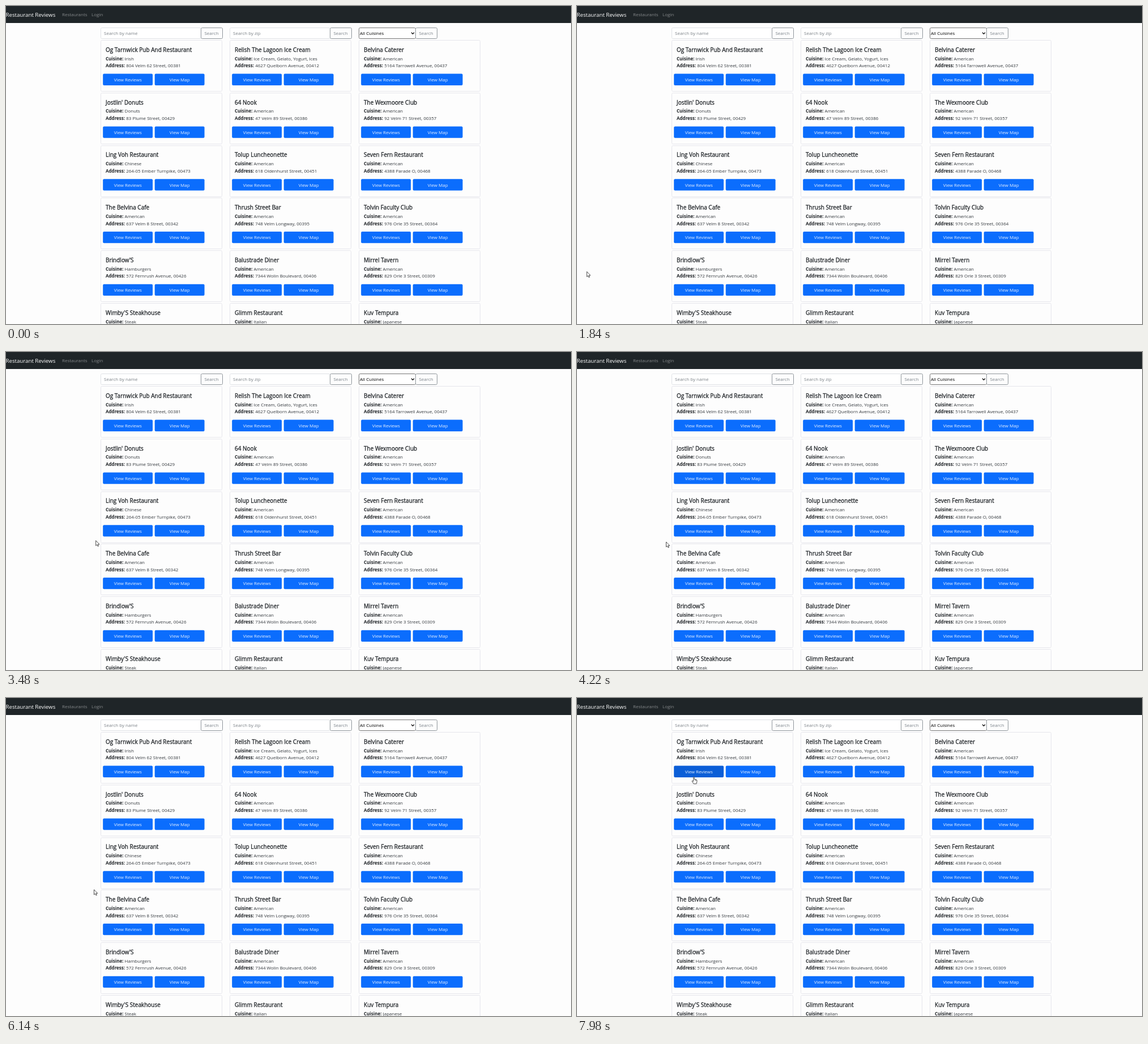
An HTML page with a canvas for the animation above (8 s loop, 998 by 561 pixels).

```html
<!DOCTYPE html>
<html lang="en">
<head>
<meta charset="utf-8">
<title>Restaurant Reviews</title>
<style>
  html, body { margin: 0; width: 100%; height: 100%; overflow: hidden; background: #fdfdfd; }
  #stage { position: absolute; left: 0; top: 0; width: 998px; height: 561px; overflow: hidden; }
  canvas, svg { position: absolute; left: 0; top: 0; }
  .t { position: absolute; white-space: pre; color: #33383d;
       font: 400 8px/16px "Open Sans", "Noto Sans", sans-serif; }
  .t b { font-weight: 700; color: #212529; }
  .title { font-size: 10px; color: #212529; -webkit-text-stroke: .3px #212529; }
  .brand { font-size: 9.7px; color: #fff; }
  .link { color: #85888a; }
  .hint { color: #7b8187; }
  .btn { width: 88px; text-align: center; color: #e6f0ff; }
  .find { width: 38px; text-align: center; color: #7b838a; }
  .pick { color: #000; }
</style>
</head>
<body>
<div id="stage">
  <canvas id="shapes" width="998" height="561"></canvas>
  <div id="text"></div>
  <svg width="998" height="561" stroke="#222" stroke-linejoin="round" fill="#fff">
    <path id="arrow" stroke-width=".8" d="M0 0V9L2.1 7.2L3.5 10.2L4.9 9.6L3.6 6.6H6.3Z"/>
    <path id="hand" stroke-width=".8" d="M-.8 .6Q0-.5 .8 .6V4.4L2.3 4.7L4.8 5.4Q5.8 5.9 5.5 7.4L4.5 12.3H-.5L-3.2 8.2Q-3.7 6.9-2.5 6.9L-.8 8.2ZM2.3 4.9V6.6M3.9 5.3V6.8"/>
  </svg>
</div>
<script>
const LOOP = 8000;
const COLS = [167, 395, 623];
const PITCH = 92.8;
const BUTTON = { dx: 4.2, dy: 59.6, w: 87.9, h: 20.3, step: 91.5 };
const PLACES = [
  ["Og Tarnwick Pub And Restaurant", "Irish", "804 Velm 62 Street, 00381"],
  ["Relish The Lagoon Ice Cream", "Ice Cream, Gelato, Yogurt, Ices", "4627 Quelborn Avenue, 00412"],
  ["Belvina Caterer", "American", "5164 Tarrowell Avenue, 00437"],
  ["Jostlin' Donuts", "Donuts", "83 Plume Street, 00429"],
  ["64 Nook", "American", "47 Velm 89 Street, 00386"],
  ["The Wexmoore Club", "American", "92 Velm 71 Street, 00357"],
  ["Ling Voh Restaurant", "Chinese", "264-05 Ember Turnpike, 00473"],
  ["Tolup Luncheonette", "American", "618 Oldenhurst Street, 00451"],
  ["Seven Fern Restaurant", "American", "4388 Parade O, 00468"],
  ["The Belvina Cafe", "American", "637 Velm 8 Street, 00342"],
  ["Thrush Street Bar", "American", "748 Velm Longway, 00395"],
  ["Tolvin Faculty Club", "American", "976 Orle 35 Street, 00364"],
  ["Brindlow'S", "Hamburgers", "572 Fernrush Avenue, 00426"],
  ["Balustrade Diner", "American", "7344 Wolin Boulevard, 00406"],
  ["Mirrel Tavern", "American", "829 Orle 3 Street, 00309"],
  ["Wimby'S Steakhouse", "Steak"],
  ["Glimm Restaurant", "Italian"],
  ["Kuv Tempura", "Japanese"]
];
// Pointer path: time, x, y
const PATH = [
  [1680, -4, 487], [1840, 17, 469], [2560, 160, 330], [2640, 160, 330],
  [4220, 157.5, 335], [6140, 155.5, 338], [7300, 155.5, 338], [7860, 206.5, 139]
];

const $ = id => document.getElementById(id);
const ctx = $("shapes").getContext("2d");

function label(str, x, y, kind, bold) {
  const el = document.createElement("div");
  el.className = "t " + kind;
  el.style.left = x + "px";
  el.style.top = y - 8 + "px";
  if (bold) {
    const b = document.createElement("b");
    b.textContent = bold + " ";
    el.append(b);
  }
  el.append(str);
  $("text").append(el);
}

function box(x, y, w, h, fill, stroke, r = 2) {
  const inset = stroke ? .5 : 0;
  ctx.beginPath();
  ctx.roundRect(x + inset, y + inset, w - 2 * inset, h - 2 * inset, r);
  if (fill) { ctx.fillStyle = fill; ctx.fill(); }
  if (stroke) { ctx.strokeStyle = stroke; ctx.lineWidth = 1; ctx.stroke(); }
}

function searchButton(x) {
  box(x, 38, 39, 20, null, "#8f959b");
  label("Search", x, 48, "find");
}

function drawHeader() {
  box(0, 0, 998, 30, "#1f2528", null, 0);
  label("Restaurant Reviews", -.5, 15.5, "brand");
  label("Restaurants", 99, 15, "link");
  label("Login", 151, 15, "link");
  ["name", "zip"].forEach((field, i) => {
    box(COLS[i], 38, 178, 20, "#fff", "#dfe2e6");
    label("Search by " + field, COLS[i] + 6, 48, "hint");
    searchButton(COLS[i] + 177);
  });
  box(623, 38, 101, 20, "#fff", "#757575");
  label("All Cuisines", 625, 48, "pick");
  ctx.beginPath();
  ctx.moveTo(716, 46.8);
  ctx.lineTo(718.5, 49.3);
  ctx.lineTo(721, 46.8);
  ctx.strokeStyle = "#111";
  ctx.lineWidth = 1.3;
  ctx.stroke();
  searchButton(723);
}

function drawCard([name, cuisine, address], i) {
  const x = COLS[i % 3], y = 60 + Math.floor(i / 3) * PITCH;
  box(x, Math.round(y), 215, 91, null, "#e6e6ec");
  label(name, x + 9, y + 16.8, "title");
  label(cuisine, x + 9, y + 32.6, "", "Cuisine:");
  if (!address) return;
  label(address, x + 9, y + 45.2, "", "Address:");
  ["View Reviews", "View Map"].forEach((str, k) => {
    const bx = x + BUTTON.dx + k * BUTTON.step;
    box(bx, y + BUTTON.dy, BUTTON.w, BUTTON.h, "#0b6dfd");
    label(str, bx, y + 70, "btn");
  });
}

function pointerAt(t) {
  const n = PATH.findIndex(p => p[0] > t);
  if (n === 0) return null;
  if (n < 0) return PATH[PATH.length - 1].slice(1);
  const [t0, x0, y0] = PATH[n - 1], [t1, x1, y1] = PATH[n];
  let k = (t - t0) / (t1 - t0);
  if (n === 2) k = 1 - (1 - k) ** 2;
  if (n === PATH.length - 1) k = k * k * (3 - 2 * k);
  return [x0 + (x1 - x0) * k, y0 + (y1 - y0) * k];
}

const first = { x: COLS[0] + BUTTON.dx, y: 60 + BUTTON.dy };
const overButton = p => p && p[0] > first.x && p[0] < first.x + BUTTON.w
  && p[1] > first.y && p[1] < first.y + BUTTON.h;

// The first button darkens over 150 ms once the pointer reaches it
function hoverAmount(t) {
  let steps = 0;
  for (let i = 0; i < 15; i++) if (overButton(pointerAt(t - i * 10))) steps++;
  return steps / 15;
}

function place(el, p, shown) {
  el.style.display = shown ? "" : "none";
  if (shown) el.setAttribute("transform", `translate(${p[0]} ${p[1]})`);
}

function frame(now) {
  const t = now % LOOP;
  const p = pointerAt(t), over = overButton(p), h = hoverAmount(t);
  ctx.clearRect(170, 118, 91, 24);
  box(first.x, first.y, BUTTON.w, BUTTON.h, `rgb(11,${109 - 15 * h},${253 - 38 * h})`);
  place($("arrow"), p, p && !over);
  place($("hand"), p, over);
  requestAnimationFrame(frame);
}

drawHeader();
PLACES.forEach(drawCard);
requestAnimationFrame(frame);
</script>
</body>
</html>
```
